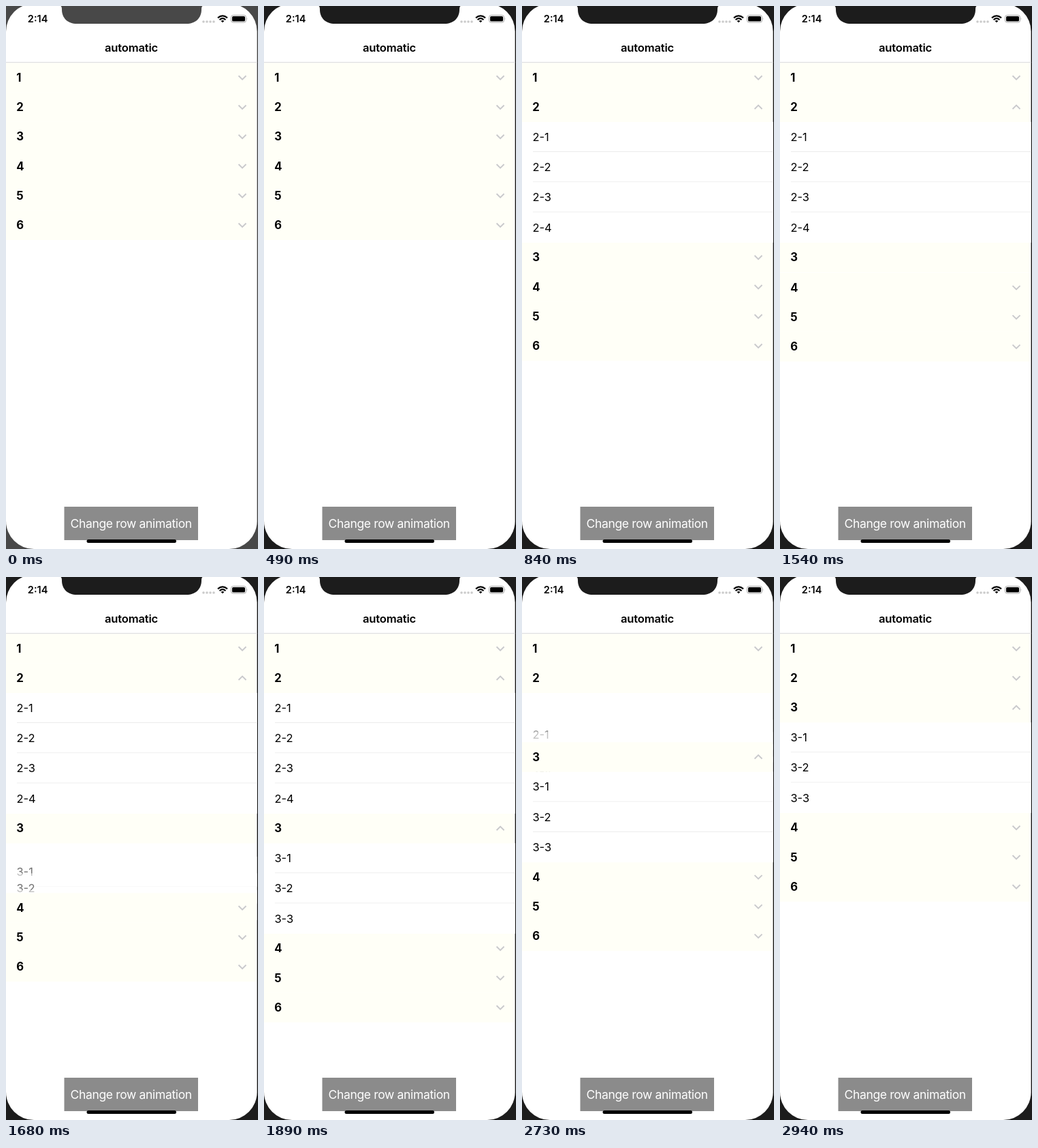
An HTML page that plays this animation: 370x796 px, repeating every 3.78 s.

```html
<!DOCTYPE html>
<html lang="en">
<head>
<meta charset="utf-8">
<title>Expandable rows</title>
<style>
  html, body { margin: 0; width: 100%; height: 100%; overflow: hidden; background: #1c1c1c; }
  svg { display: block; width: 370px; height: 796px; font-family: Inter, "Liberation Sans", sans-serif; }
  .bezel { fill: #1c1c1c; }
  .header rect { fill: #fffff7; }
  .header text { font-size: 16.7px; font-weight: 700; }
  .header path { fill: none; stroke: #c9c9cc; stroke-width: 1.9; }
  .cell rect { fill: #fff; }
  .cell text { font-size: 16.5px; }
  .cell line { stroke: #ececec; }
  .clock { font-size: 14.6px; font-weight: 600; }
  .title { font-size: 16.6px; font-weight: 600; letter-spacing: -.2px; text-anchor: middle; }
  .button { font-size: 17.5px; letter-spacing: -.35px; text-anchor: middle; fill: #fff; }
</style>
</head>
<body>
<svg viewBox="0 0 370 796">
  <defs>
    <clipPath id="screen"><rect x="0" y="-3.5" width="368.6" height="799.5" rx="41"/></clipPath>
  </defs>
  <rect class="bezel" width="370" height="796"/>
  <g clip-path="url(#screen)">
    <rect width="370" height="796" fill="#fff"/>
    <g id="table"></g>
    <rect y="82" width="370" height="1.2" fill="#dedee0"/>
    <text class="title" x="184" y="67.3">automatic</text>
    <text class="clock" x="31.8" y="24.2">2:14</text>
    <g fill="#cbcbcb">
      <circle cx="290" cy="23" r="1.8"/><circle cx="295" cy="23" r="1.8"/>
      <circle cx="300" cy="23" r="1.8"/><circle cx="305" cy="23" r="1.8"/>
    </g>
    <g fill="none" stroke="#000" stroke-width="2.2">
      <path d="M311 17.3Q318 11.3 325 17.3"/>
      <path d="M313.6 20.2Q318 16.2 322.4 20.2"/>
      <path d="M315.6 21.9Q318 19.9 320.4 21.9L318 24.3Z" fill="#000" stroke="none"/>
    </g>
    <rect x="330.5" y="13.5" width="22" height="10.6" rx="3" fill="none" stroke="#a6a6a6"/>
    <rect x="332" y="15" width="19" height="7.6" rx="1.7"/>
    <path d="M353.8 17Q355.4 18.8 353.8 20.6Z" fill="#a6a6a6"/>
    <rect x="85.5" y="734" width="196.5" height="49" fill="#8b8b8b"/>
    <text class="button" x="183.7" y="765">Change row animation</text>
    <rect x="118.5" y="782" width="131.5" height="5" rx="2.5"/>
  </g>
  <path class="bezel" d="M80.5 0Q82 1 82 5C82 18 91 26 104 26H265C278 26 287 18 287 5Q287 1 288.5 0Z"/>
</svg>
<script>
const LOOP = 3780, STEP = 70, MOVE = 300;
const TOP = 83.4, HEAD = 43.25, CELL = 44.25;
const counts = { 2: 4, 3: 3 };
const table = document.getElementById('table');
const bezels = document.querySelectorAll('.bezel');

function add(parent, tag, attrs, text) {
  const el = document.createElementNS('http://www.w3.org/2000/svg', tag);
  for (const k in attrs) el.setAttribute(k, attrs[k]);
  if (text) el.textContent = text;
  return parent.appendChild(el);
}

function makeCell(id, i, n) {
  const g = add(table, 'g', { class: 'cell' });
  add(g, 'rect', { width: 370, height: CELL });
  add(g, 'text', { x: 15.4, y: 28 }, `${id}-${i + 1}`);
  if (i < n - 1) add(g, 'line', { x1: 16, x2: 370, y1: CELL - .6, y2: CELL - .6 });
  return g;
}

function makeHeader(id) {
  const g = add(table, 'g', { class: 'header' });
  add(g, 'rect', { width: 367.5, height: HEAD + .2 });
  add(g, 'text', { x: 15.2, y: 27.6 }, String(id));
  return { g, arrow: add(g, 'path', { d: 'M-5.5 -2.7L0 2.7L5.5 -2.7' }) };
}

// Cells come first so that the section headers cover them
const cells = {};
for (const id of [2, 3])
  cells[id] = Array.from({ length: counts[id] }, (_, i) => makeCell(id, i, counts[id]));
const headers = [1, 2, 3, 4, 5, 6].map(makeHeader);

// Ease-in-out, cubic-bezier(.42, 0, .58, 1)
function ease(x) {
  if (x <= 0) return 0;
  if (x >= 1) return 1;
  let lo = 0, hi = 1, s;
  for (let i = 0; i < 24; i++) {
    s = (lo + hi) / 2;
    const bx = 1.26 * s * (1 - s) ** 2 + 1.74 * s * s * (1 - s) + s ** 3;
    if (bx < x) lo = s; else hi = s;
  }
  return s * s * (3 - 2 * s);
}

const shift = (el, y) => el.setAttribute('transform', `translate(0 ${y.toFixed(2)})`);

function draw(t) {
  const run = start => ease((t - start) / MOVE);
  const open = { 2: run(505) - run(2564), 3: run(1521) };
  let y = TOP;
  headers.forEach((h, k) => {
    const id = k + 1, p = open[id] || 0;
    shift(h.g, y);
    h.arrow.setAttribute('transform', `translate(347 21.6) scale(1 ${p === 1 ? -1 : 1})`);
    h.arrow.style.display = p > 0 && p < 1 ? 'none' : '';
    y += HEAD;
    if (!cells[id]) return;
    const size = counts[id] * CELL, mid = (size - CELL) / 2;
    cells[id].forEach((c, i) => {
      shift(c, y + mid + (i * CELL - mid) * p);
      c.style.opacity = p;
    });
    y += size * p;
  });
  bezels.forEach(b => b.style.fill = t < 490 ? '#484848' : '#1c1c1c');
}

const begin = performance.now();
function tick() {
  const t = Math.max(0, performance.now() - begin) % LOOP;
  draw(Math.floor(t / STEP) * STEP);
  requestAnimationFrame(tick);
}
tick();
</script>
</body>
</html>
```
